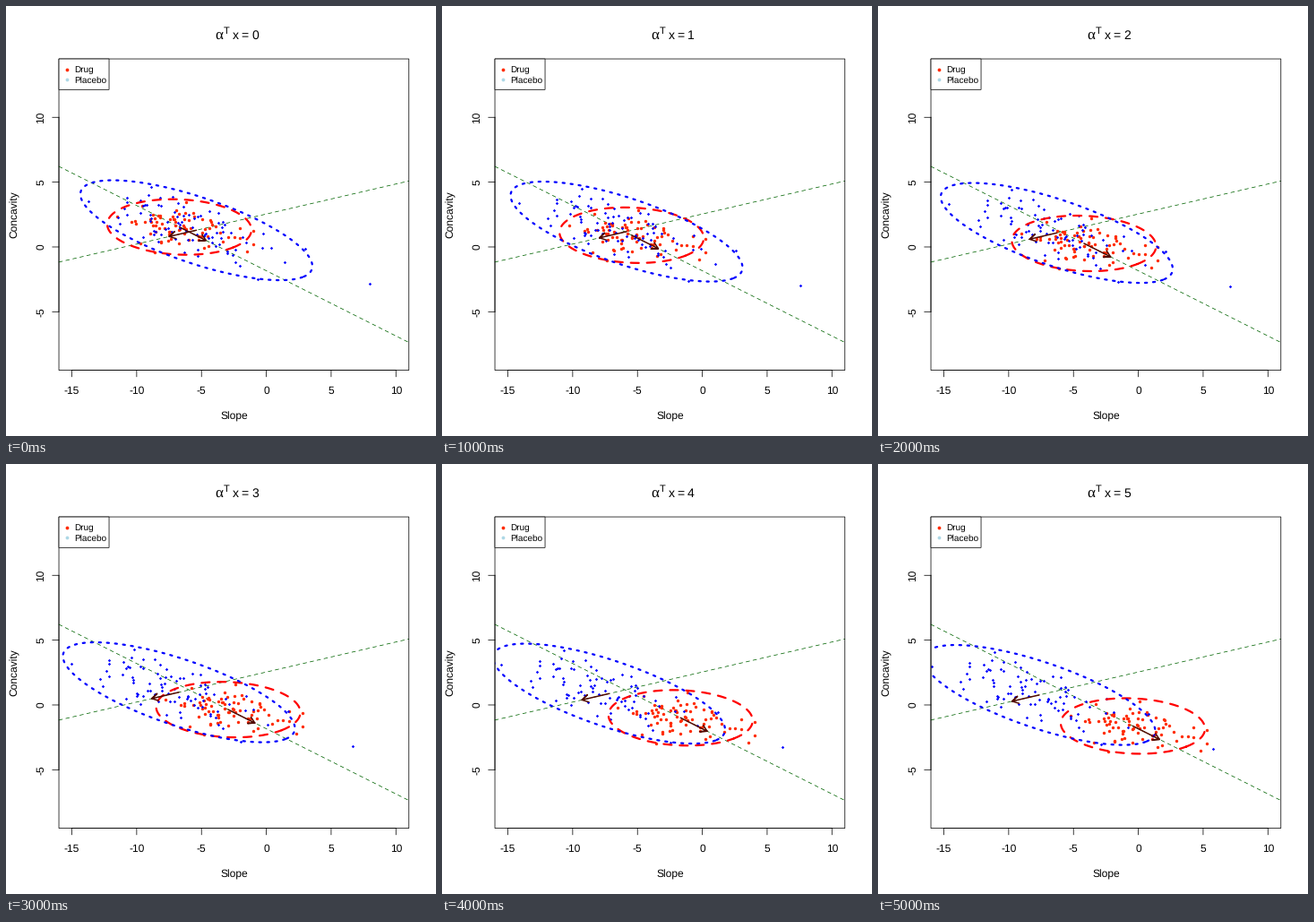
Recreate the animation shown at these times as a matplotlib script. Size 480 by 480 pixels, loop 6000 ms.

```python
import matplotlib.pyplot as plt
import numpy as np
from matplotlib.animation import FuncAnimation
from matplotlib.patches import Rectangle

plt.rcParams.update({"path.snap": False, "text.hinting": "none",
                     "text.hinting_factor": 1})

SIZE, DPI = 480, 100
PT = 72 / DPI                      # points per pixel
LEFT, RIGHT, TOP, BOTTOM = 59.04, 449.76, 59.04, 406.56
UNIT = (RIGHT - LEFT) / 27         # pixels per data unit
THIN = 0.75

fig = plt.figure(figsize=(SIZE / DPI, SIZE / DPI), dpi=DPI, facecolor="white")
ax = fig.add_axes([0, 0, 1, 1])
ax.set(xlim=(0, SIZE), ylim=(SIZE, 0))
ax.axis("off")


def px(x):
    return LEFT + UNIT * (x + 16)


def py(y):
    return (TOP + BOTTOM) / 2 + UNIT * (2.5 - y)


def label(x, y, s, size=12, font="Liberation Sans", **kw):
    return ax.text(x, y, s, fontsize=size * PT, va="baseline", family=font,
                   rotation_mode="anchor", **kw)


def line(x, y, width=THIN, color="black", **kw):
    return ax.plot(x, y, lw=width * PT, color=color, **kw)[0]


def frame(width, height, fill, z):
    return ax.add_patch(Rectangle((LEFT, TOP), width, height, fc=fill,
                                  ec="black", lw=THIN * PT, zorder=z))


# Axes
box = frame(RIGHT - LEFT, BOTTOM - TOP, "none", 6)
for v in range(-15, 11, 5):
    line([px(v)] * 2, [BOTTOM, BOTTOM + 7.2])
    label(px(v), 432.6, str(v), ha="center")
for v in range(-5, 11, 5):
    line([LEFT, LEFT - 7.2], [py(v)] * 2)
    label(42, py(v), str(v), ha="center", rotation=90)
line([px(-15), px(10)], [BOTTOM] * 2)
line([LEFT] * 2, [py(-5), py(10)])
label(px(-2.5), 461.5, "Slope", ha="center")
label(12.5, py(2.5), "Concavity", ha="center", rotation=90)

# Title
label(233.3, 37, "α", 16.5, "Liberation Serif")
label(242.5, 31, "T", 11.5)
label(252.8, 37, "x", 14.4)
label(262.2, 37, "=", 14.4)
value = label(274, 37, "0", 14.4)

# Legend
frame(56, 34.3, "white", 7)
for y, s, c in ((70.6, "Drug", "#ff2a00"), (82.1, "Placebo", "lightblue")):
    ax.plot(67.7, y, "o", ms=3.8 * PT, mew=0, color=c, zorder=8)
    label(76, y + 3.4, s, 9.6, zorder=8)


class Group:
    """A point cloud with its ellipse, sliding along a line of given slope."""

    def __init__(self, center, radii, rho, slope, step, reach, color, dot,
                 dash, outliers, count, seed):
        self.center, radii = np.array(center), np.array(radii)
        along = np.array([1, slope])
        self.step, self.reach = step * along, reach * along

        # Bivariate normal scatter, kept within the ellipse
        rng = np.random.default_rng(seed)
        u, w = rng.normal(0, 0.41, (2, 4 * count))
        keep = np.hypot(u, w) < 0.92
        u, w = u[keep][:count], w[keep][:count]
        v = rho * u + np.sqrt(1 - rho ** 2) * w
        self.pts = np.vstack([outliers, self.center + radii * np.c_[u, v]])

        t = np.linspace(0, 2 * np.pi, 240)
        d = np.arccos(rho) / 2
        self.ring = self.center + radii * np.c_[np.cos(t - d), np.cos(t + d)]

        ends = np.array([LEFT, RIGHT])
        line(ends, center[1] + slope * (ends - center[0]), color="darkgreen",
             ls=(0, (5.33, 5.33)), dash_capstyle="round", zorder=2)
        marker, size, fill = dot
        self.dots = ax.plot([], [], marker, ms=size * PT, mew=0, color=fill,
                            zorder=3)[0]
        self.curve = line([], [], 2.25, color, ls=(0, dash),
                          dash_capstyle="round", zorder=4)
        self.arrow = line([], [], 1.5, "#520a00", solid_capstyle="round",
                          solid_joinstyle="round", zorder=5)
        for artist in (self.dots, self.curve, self.arrow):
            artist.set_clip_path(box)

    def move(self, k):
        shift = k * self.step
        self.dots.set_data(*(self.pts + shift).T)
        self.curve.set_data(*(self.ring + shift).T)
        tail = self.center + shift
        tip = tail + self.reach
        back = np.arctan2(*-self.reach[::-1])
        barbs = [tip + 8 * np.array([np.cos(a), np.sin(a)])
                 for a in (back - np.pi / 6, back + np.pi / 6)]
        self.arrow.set_data(*np.array([tail, tip, barbs[0], tip, barbs[1]]).T)


drug = Group(center=(193.5, 246.7), radii=(80.5, 31), rho=0.1, slope=0.503,
             step=18.2, reach=29.7, color="#ff0000", dot=("o", 3.4, "#ff2a00"),
             dash=(4, 4), count=72, seed=4,
             outliers=[(276, 251), (276, 266), (269, 274), (166, 275)])
placebo = Group(center=(212.5, 250.3), radii=(129.5, 55.8), rho=0.72,
                slope=-0.2317, step=-6.5, reach=-30.3, color="#0000ff",
                dot=("D", 2.4, "#0000ff"), dash=(1, 3), count=80, seed=9,
                outliers=[(406, 310), (334, 271), (281, 305), (311, 286),
                          (92, 218), (162, 202)])


def update(k):
    value.set_text(str(k))
    drug.move(k)
    placebo.move(k)
    return ()


ani = FuncAnimation(fig, update, frames=6, interval=1000,
                    init_func=lambda: update(0), repeat=True)
plt.show()
```
